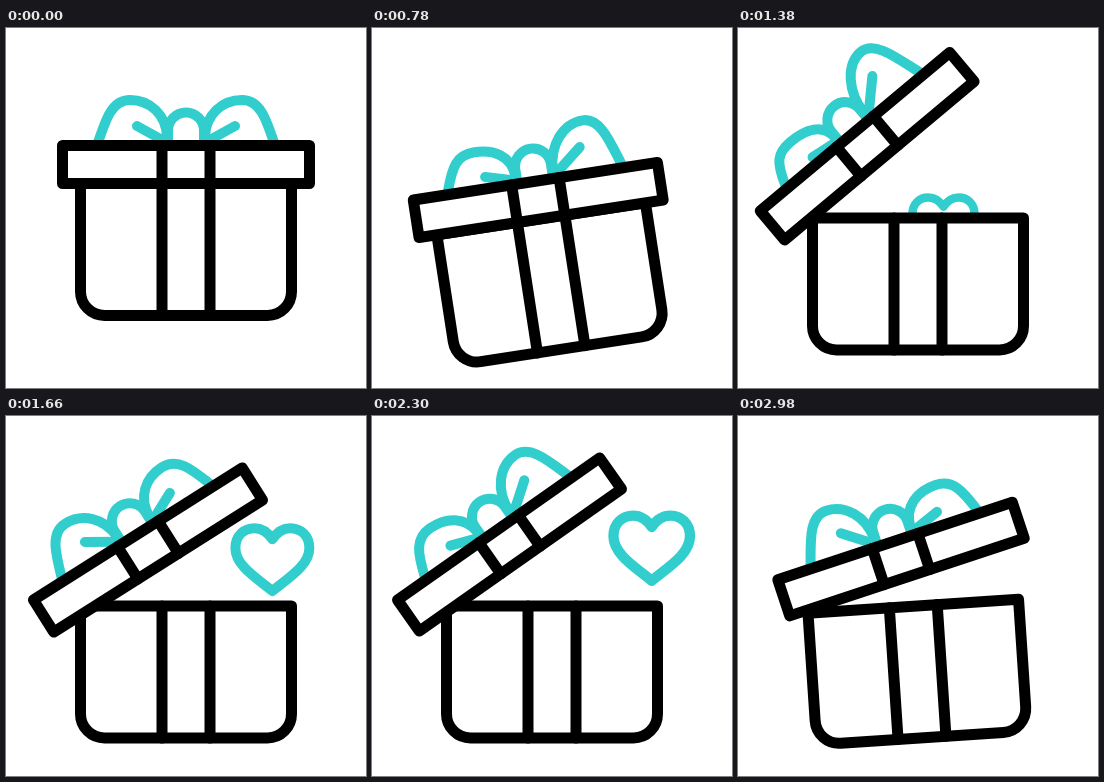
An HTML page with a canvas that plays this animation: 360x360 px, repeating every 3000 ms.

```html
<!DOCTYPE html>
<html lang="en">
<head>
<meta charset="utf-8">
<title>Gift box</title>
<style>
html, body { margin: 0; width: 100%; height: 100%; overflow: hidden; background: #fff; }
canvas { display: block; width: 360px; height: 360px; }
</style>
</head>
<body>
<canvas id="stage"></canvas>
<script>
const LOOP = 3000, TEAL = '#32cdcd', INK = '#000', RAD = Math.PI / 180;
const canvas = document.getElementById('stage');
const dpr = window.devicePixelRatio || 1;
canvas.width = canvas.height = 360 * dpr;
const ctx = canvas.getContext('2d');

// Keyframes: [time, value, value, ...]
const drop = [[0, 0], [320, 34.5]];
const tilt = [[0, 0], [410, 9.6], [730, -9.4], [1040, 0], [2790, 0], [2980, -3.8], [3000, -4.4]];
// lid centre x, y and angle inside the box
const lid = [
  [1040, 180, 136.5, 0], [1140, 168, 114.5, -14.8], [1360, 129, 83.5, -40],
  [1660, 142, 99.5, -32.3], [1950, 137.5, 94, -35.1], [2640, 137.5, 94, -35.1],
  [2980, 170.9, 107.7, -14.5], [3000, 172, 109.5, -13]
];
const sway = [
  [0, 0], [420, 9], [740, -8], [1140, 8], [1370, -12], [1660, 2],
  [1950, -5.5], [2640, -5.5], [2980, 5], [3000, 5.5]
];

// Smooth interpolation, flat at turning points and at both ends
function slope(keys, i, c) {
  if (i === 0 || i === keys.length - 1) return 0;
  const [p, k, n] = [keys[i - 1], keys[i], keys[i + 1]];
  return (k[c] - p[c]) * (n[c] - k[c]) <= 0 ? 0 : (n[c] - p[c]) / (n[0] - p[0]);
}

function at(keys, t, c = 1) {
  const last = keys.length - 1;
  if (t <= keys[0][0]) return keys[0][c];
  if (t >= keys[last][0]) return keys[last][c];
  let i = 0;
  while (keys[i + 1][0] < t) i++;
  const a = keys[i], b = keys[i + 1], d = b[0] - a[0], u = (t - a[0]) / d;
  const e = u * u * (3 - 2 * u);
  return a[c] + (b[c] - a[c]) * e
    + slope(keys, i, c) * d * u * (1 - u) * (1 - u)
    - slope(keys, i + 1, c) * d * u * u * (1 - u);
}

function line(x1, y1, x2, y2) {
  ctx.beginPath();
  ctx.moveTo(x1, y1);
  ctx.lineTo(x2, y2);
  ctx.stroke();
}

function pen(color, width) {
  ctx.strokeStyle = color;
  ctx.lineWidth = width;
  ctx.lineCap = ctx.lineJoin = 'round';
  ctx.fillStyle = '#fff';
}

function within(x, y, deg, draw) {
  ctx.save();
  ctx.translate(x, y);
  ctx.rotate(deg * RAD);
  draw();
  ctx.restore();
}

function halfBow(side, h) {
  const top = -64.5 - h;
  ctx.save();
  ctx.scale(side, 1);
  ctx.beginPath();
  ctx.moveTo(88, -22);
  ctx.bezierCurveTo(80, -46, 74, top, 56, top);
  ctx.bezierCurveTo(36, top, 20, -50 - h / 3, 19, -28);
  ctx.stroke();
  line(49, -38.5 - h, 21, -23);
  ctx.restore();
}

function bow(h) {
  pen(TEAL, 10);
  halfBow(-1, h);
  halfBow(1, -h);
  ctx.beginPath();
  ctx.arc(0, -34, 18, Math.PI, 0);
  ctx.lineTo(18, -24);
  ctx.moveTo(-18, -34);
  ctx.lineTo(-18, -24);
  ctx.stroke();
}

function cover() {
  pen(INK, 11);
  ctx.beginPath();
  ctx.rect(-123.5, -19, 247, 38);
  ctx.fill();
  ctx.stroke();
  line(-24, -19, -24, 19);
  line(24, -19, 24, 19);
}

// Drawn around the tilt centre
function body() {
  pen(INK, 11);
  ctx.beginPath();
  ctx.moveTo(-105.5, -71.5);
  ctx.lineTo(105.5, -71.5);
  ctx.arcTo(105.5, 60.5, 0, 60.5, 24);
  ctx.arcTo(-105.5, 60.5, -105.5, 0, 24);
  ctx.closePath();
  ctx.fill();
  ctx.stroke();
  line(-24, -71.5, -24, 60.5);
  line(24, -71.5, 24, 60.5);
}

function heart(t) {
  const u = t / 740;
  if (u <= 0 || u >= 1) return;
  const s = -0.5 + 1.52 * (1 - Math.pow(1 - u, 1.6));
  const size = 0.88 + 0.22 * s;
  ctx.save();
  ctx.globalAlpha = Math.min(1, (740 - t) / 280);
  ctx.translate(221 + 84 * s, 183 - 72 * s);
  ctx.scale(size, size);
  pen(TEAL, 10);
  ctx.beginPath();
  ctx.moveTo(0, 31);
  ctx.bezierCurveTo(-14, 19, -37, 6, -37, -12);
  ctx.bezierCurveTo(-37, -25, -28, -32, -18, -32);
  ctx.bezierCurveTo(-9, -32, -4, -27, 0, -21);
  ctx.bezierCurveTo(4, -27, 9, -32, 18, -32);
  ctx.bezierCurveTo(28, -32, 37, -25, 37, -12);
  ctx.bezierCurveTo(37, 6, 14, 19, 0, 31);
  ctx.closePath();
  ctx.stroke();
  ctx.restore();
}

function render(t) {
  ctx.setTransform(dpr, 0, 0, dpr, 0, 0);
  ctx.fillStyle = '#fff';
  ctx.fillRect(0, 0, 360, 360);
  heart(t - 1280);
  heart(t - 1840);
  within(180, 227 + at(drop, t), at(tilt, t), () => {
    const pose = [at(lid, t, 1) - 180, at(lid, t, 2) - 227, at(lid, t, 3)];
    within(...pose, () => bow(at(sway, t)));
    body();
    within(...pose, cover);
  });
}

let start = null;
function tick(now) {
  if (start === null) start = now;
  render((now - start) % LOOP);
  requestAnimationFrame(tick);
}
render(0);
requestAnimationFrame(tick);
</script>
</body>
</html>
```
